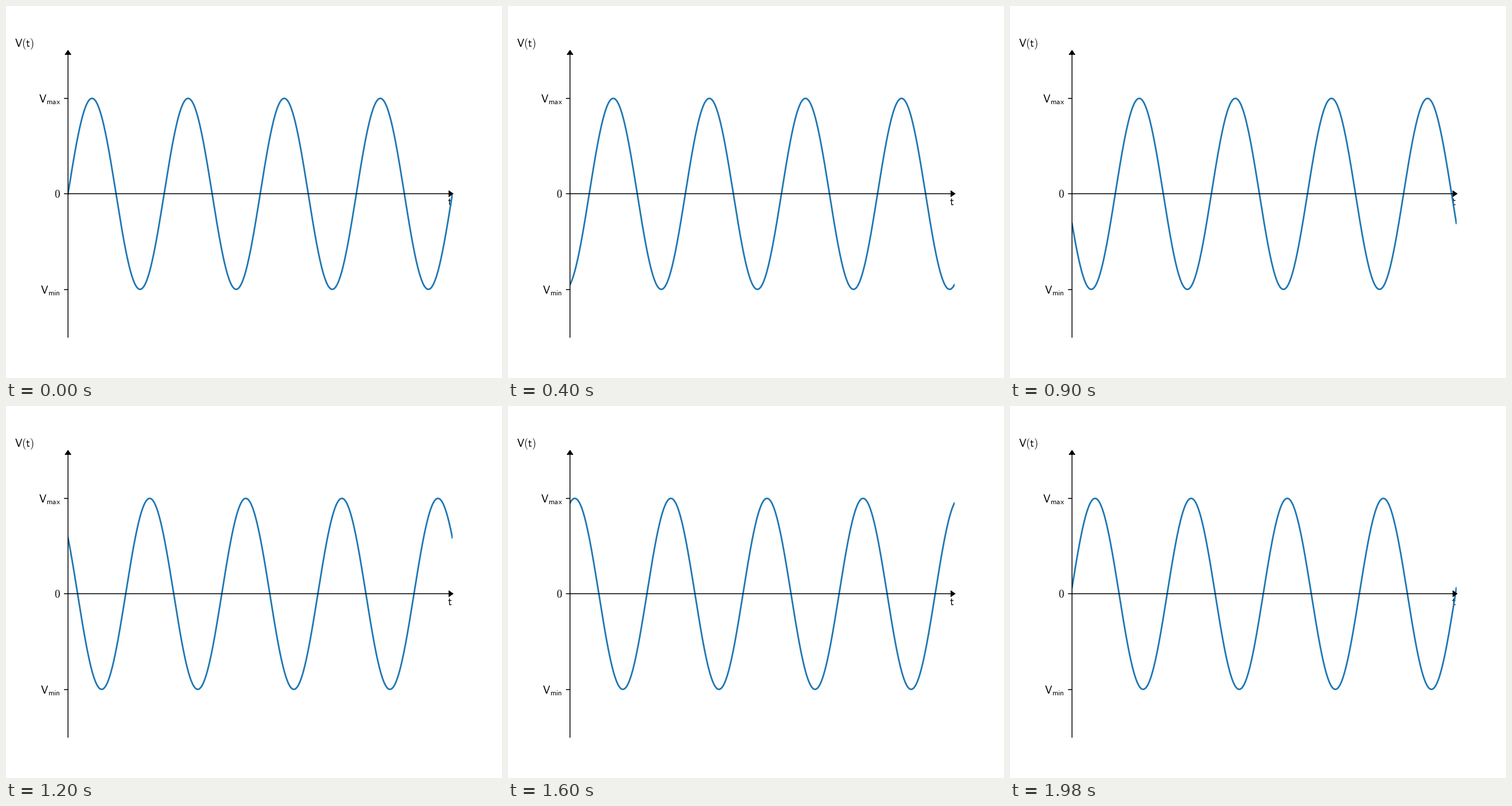
Write a matplotlib script that moves like this. It is 864 px wide and 648 px high and loops after 2 s.

```python
import numpy as np
import matplotlib.pyplot as plt
from matplotlib.animation import FuncAnimation
from matplotlib.markers import CARETRIGHT, CARETUP

FRAMES = 100
INTERVAL = 20
PERIODS = 4

plt.rcParams.update({
    "font.family": "Liberation Sans",
    "font.size": 10,
    "mathtext.fontset": "cm",
})


def sans(text, sub=None):
    """Upright sans math text with an optional subscript."""
    tail = rf"_{{\mathsf{{{sub}}}}}" if sub else ""
    return rf"$\mathsf{{{text}}}{tail}$"


fig, ax = plt.subplots(figsize=(6.4, 4.8), dpi=135)
ax.set_xlim(0, PERIODS)
ax.set_ylim(-1.5, 1.5)

# Axes cross at the origin and end in arrow heads
ax.spines[["top", "right"]].set_visible(False)
ax.spines["bottom"].set_position(("data", 0))
head = dict(color="k", markersize=5, clip_on=False, zorder=3)
ax.plot(1, 0, marker=CARETRIGHT, transform=ax.get_yaxis_transform(), **head)
ax.plot(0, 1, marker=CARETUP, transform=ax.get_xaxis_transform(), **head)

ax.set_xticks([])
ax.set_yticks([-1, 0, 1], [sans("V", "min"), sans("0"), sans("V", "max")])
ax.set_xlabel(sans("t"), loc="right", labelpad=3.7)
ax.set_ylabel(sans("V(t)"), loc="top", rotation=0, labelpad=4.4)

t = np.linspace(0, PERIODS, 1000)
wave, = ax.plot(t, np.sin(2 * np.pi * t), color="#1f77b4", lw=1.5)


def update(i):
    wave.set_ydata(np.sin(2 * np.pi * (t - i / FRAMES)))
    return wave,


anim = FuncAnimation(fig, update, frames=FRAMES, interval=INTERVAL,
                     repeat=True, repeat_delay=0)
plt.show()
```
